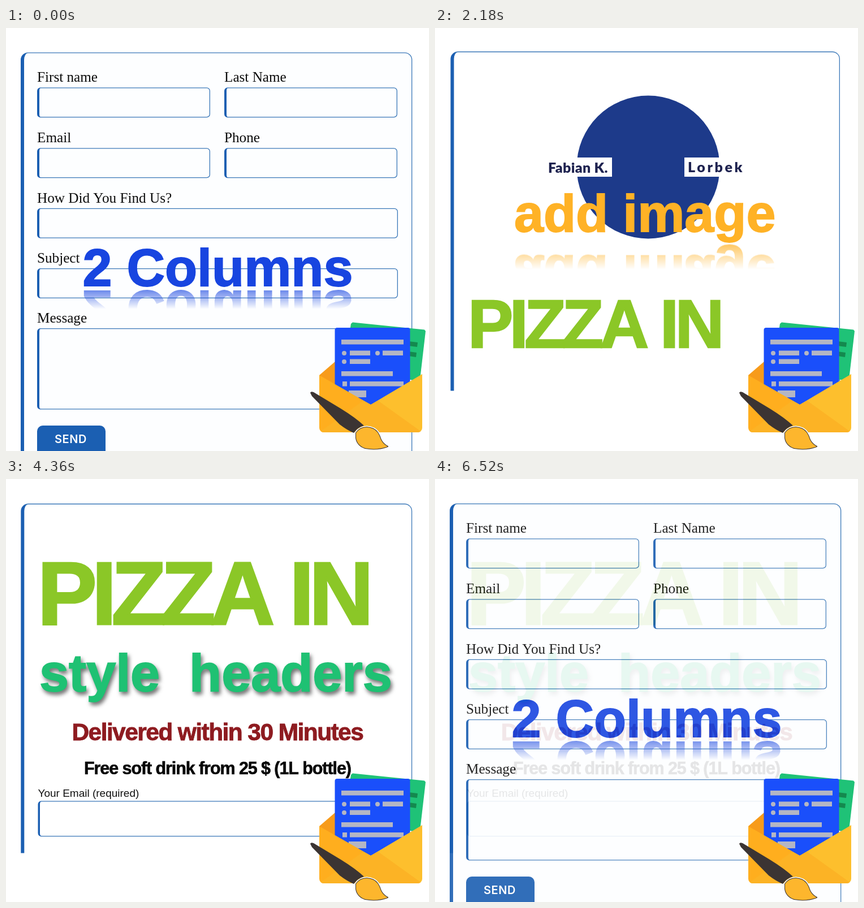
An HTML page with a canvas that plays this animation: 748x748 px, repeating every 6540 ms.

```html
<!DOCTYPE html>
<html lang="en">
<head>
<meta charset="utf-8">
<title>Form styles</title>
<style>
  html, body { margin: 0; width: 100%; height: 100%; overflow: hidden; background: #fff; }
  canvas { display: block; width: 748px; height: 748px; }
</style>
</head>
<body>
<canvas id="stage" width="748" height="748"></canvas>
<script>
const SIZE = 748, LOOP = 6540, STEP = 20;
const FADES = [2000, 4180, 6360];
const SANS = '"Liberation Sans", Arial, sans-serif';
const SERIF = '"Liberation Serif", "Times New Roman", serif';
const BLUE = '#1b5fb2', LINE = '#3b78b8', LIME = '#8bc727';

function layer(draw, background) {
  const canvas = document.createElement('canvas');
  canvas.width = canvas.height = SIZE;
  const c = canvas.getContext('2d');
  if (background) {
    c.fillStyle = background;
    c.fillRect(0, 0, SIZE, SIZE);
  }
  draw(c);
  return canvas;
}

function text(c, str, x, y, font, color, spacing = 0) {
  c.font = font;
  c.fillStyle = color;
  c.letterSpacing = spacing + 'px';
  c.fillText(str, x, y);
}

// Bold sans text, thickened a little by an outline that keeps the baseline.
function heavy(c, str, x, y, size, color, spacing) {
  const base = y - size * 0.01;
  text(c, str, x, base, `bold ${size}px ${SANS}`, color, spacing);
  c.strokeStyle = color;
  c.lineWidth = size * 0.02;
  c.miterLimit = 3;
  c.strokeText(str, x, base);
}

function poly(c, color, ...pts) {
  c.fillStyle = color;
  c.beginPath();
  for (let i = 0; i < pts.length; i += 2) c.lineTo(pts[i], pts[i + 1]);
  c.closePath();
  c.fill();
}

function dot(c, x, y, r, color) {
  c.fillStyle = color;
  c.beginPath();
  c.arc(x, y, r, 0, Math.PI * 2);
  c.fill();
}

// Rounded frame with a heavier left border.
function frame(c, x, y, right, bottom, r, left, inside) {
  const w = right - x, h = bottom - y, t = 1.3;
  const near = { x: Math.max(r - left, 1), y: r - t }, far = { x: r - t, y: r - t };
  const inner = () => c.roundRect(x + left, y + t, w - left - t, h - 2 * t, [near, far, far, near]);
  if (inside) {
    c.fillStyle = inside;
    c.beginPath();
    inner();
    c.fill();
  }
  c.beginPath();
  c.roundRect(x, y, w, h, r);
  inner();
  const g = c.createLinearGradient(x, 0, x + left + 4, 0);
  g.addColorStop(0.6, BLUE);
  g.addColorStop(1, LINE);
  c.fillStyle = g;
  c.fill('evenodd');
}

function panel(c, x, y, right, cut, inside) {
  c.save();
  c.beginPath();
  c.rect(0, 0, SIZE, cut);
  c.clip();
  frame(c, x, y, right, 900, 13, 6, inside);
  c.restore();
}

// Headline with a fading mirror image below it.
function mirrored(c, str, x, y, color, axis, from, to, strength) {
  const word = layer(k => heavy(k, str, x, y, 93.5, color));
  const echo = layer(k => {
    k.translate(0, 2 * axis);
    k.scale(1, -1);
    k.drawImage(word, 0, 0);
    k.resetTransform();
    const g = k.createLinearGradient(0, from, 0, to);
    g.addColorStop(0, `rgba(0,0,0,${strength})`);
    g.addColorStop(1, 'rgba(0,0,0,0)');
    k.globalCompositeOperation = 'destination-in';
    k.fillStyle = g;
    k.fillRect(0, 0, SIZE, SIZE);
  });
  c.drawImage(echo, 0, 0);
  c.drawImage(word, 0, 0);
}

function columns(c) {
  panel(c, 26, 43.3, 718.3, SIZE, '#fdfeff');
  const fields = [
    ['First name', 55, 105.3, 361],
    ['Last Name', 386, 105.3, 692],
    ['Email', 55, 212.3, 361],
    ['Phone', 386, 212.3, 692],
    ['How Did You Find Us?', 55, 318.8, 693],
    ['Subject', 55, 425, 693],
    ['Message', 55, 531, 693, 143.5]
  ];
  for (const [label, x, y, right, h = 53] of fields) {
    text(c, label, x, y - 10.2, '25.2px ' + SERIF, '#0c0c0c');
    frame(c, x, y, right, y + h, 6, 4);
  }
  c.fillStyle = BLUE;
  c.beginPath();
  c.roundRect(55, 703, 121, 60, 10);
  c.fill();
  text(c, 'SEND', 86, 734, '600 20px Inter, sans-serif', '#fff', 0.6);
  mirrored(c, '2 Columns', 135.5, 457, '#1845e0', 460.5, 463, 497, 0.65);
}

function picture(c) {
  panel(c, 27.5, 41.6, 716, 641.5);
  dot(c, 377, 246, 126.5, '#1d3a8a');
  c.fillStyle = '#fff';
  c.fillRect(195, 229, 118, 34);
  c.fillRect(441, 229, 112, 34);
  const font = '900 25px Lato, sans-serif';
  text(c, 'Fabian K.', 200, 256, font, '#1f2350', 0.3);
  text(c, 'Lorbek', 447, 255, font, '#1f2350', 3.6);
  mirrored(c, 'add image', 140, 360.5, '#ffb226', 381.3, 384, 427, 0.7);
  heavy(c, 'PIZZA IN', 58, 566, 120.5, LIME, -6.95);
}

function headers(c) {
  panel(c, 26.3, 43.6, 718.2, 661.5);
  heavy(c, 'PIZZA IN', 55.4, 259, 158, LIME, -9.1);
  const word = layer(k => heavy(k, 'style\u00a0\u00a0headers', 59, 375.5, 93.5, '#1fc173'));
  c.save();
  c.shadowColor = 'rgba(0,0,0,.55)';
  c.shadowBlur = 7;
  c.shadowOffsetX = 3;
  c.shadowOffsetY = 5;
  c.drawImage(word, 0, 0);
  c.restore();
  heavy(c, 'Delivered within 30 Minutes', 116.5, 462, 42.5, '#8e1b20', -1.58);
  heavy(c, 'Free soft drink from 25 $ (1L bottle)', 138, 522, 30.5, '#080808', -1.08);
  text(c, 'Your Email (required)', 56.5, 562, '19px ' + SANS, '#111');
  frame(c, 56.5, 569.3, 692, 632.3, 6, 3.5);
}

function badge(c) {
  // Papers
  poly(c, '#1fc277', 610, 523, 613, 520.5, 740, 533.5, 742, 536, 732, 622, 700, 622, 604, 560);
  poly(c, '#14894e', 712, 554, 728, 556, 727, 564, 712, 562);
  poly(c, '#14894e', 712, 572, 726, 574, 725, 582, 712, 580);
  poly(c, '#f79b1b', 554, 614, 583, 589, 583, 660, 554, 640);
  c.fillStyle = '#1a4ffb';
  c.beginPath();
  c.roundRect(581.5, 530, 133, 150, 4);
  c.fill();
  const grey = '#b4b6c4';
  const bars = [
    [593, 551, 110], [608, 570.5, 36], [666, 570.5, 36], [608, 585.5, 36],
    [593, 607, 91], [595, 625, 8], [608, 625, 95], [606, 641, 31, 12]
  ];
  c.fillStyle = grey;
  for (const [x, y, w, h = 8.5] of bars) c.fillRect(x, y, w, h);
  for (const [x, y] of [[598, 575], [657, 575], [598, 590]]) dot(c, x, y, 4, grey);

  // Envelope
  c.save();
  c.beginPath();
  c.roundRect(554, 600, 182, 115, 8);
  c.clip();
  poly(c, '#ffae1e', 554, 614, 645, 666, 645, 715, 554, 715);
  poly(c, '#fdbf2d', 736, 612, 645, 666, 645, 715, 736, 715);
  poly(c, '#fcb325', 554, 715, 632, 659, 645, 666, 658, 659, 736, 715);
  c.restore();

  // Brush
  const dark = '#3b3433';
  c.fillStyle = dark;
  c.fill(new Path2D('M538 645 Q539 642 544 644 L592 673 Q618 689 633 703 Q622 706 615 716 Q603 711 590 701 L541 651Z'));
  const tip = new Path2D('M619 716 Q626 706 638 706 Q651 707 657 715 Q661 721 663 728 Q667 736 675 740 Q656 747 635 743 Q621 738 619 725Z');
  c.lineJoin = 'round';
  for (const [color, width] of [['#fff', 5], [dark, 2]]) {
    c.strokeStyle = color;
    c.lineWidth = width;
    c.stroke(tip);
  }
  c.fillStyle = '#fdb62d';
  c.fill(tip);
}

const scenes = [columns, picture, headers].map(draw => layer(draw, '#fff'));
const icon = layer(badge);
const stage = document.getElementById('stage').getContext('2d');

function render(now) {
  const t = now % LOOP;
  let from = 0, mix = 0;
  FADES.forEach((start, i) => {
    if (t < start) return;
    from = i;
    mix = Math.min(1, (Math.floor((t - start) / STEP) + 1) / 10);
  });
  stage.globalAlpha = 1;
  stage.drawImage(scenes[from], 0, 0);
  stage.globalAlpha = mix;
  stage.drawImage(scenes[(from + 1) % scenes.length], 0, 0);
  stage.globalAlpha = 1;
  stage.drawImage(icon, 0, 0);
}

const origin = performance.now();
function tick() {
  render(Math.max(0, performance.now() - origin));
  requestAnimationFrame(tick);
}
tick();
</script>
</body>
</html>
```
